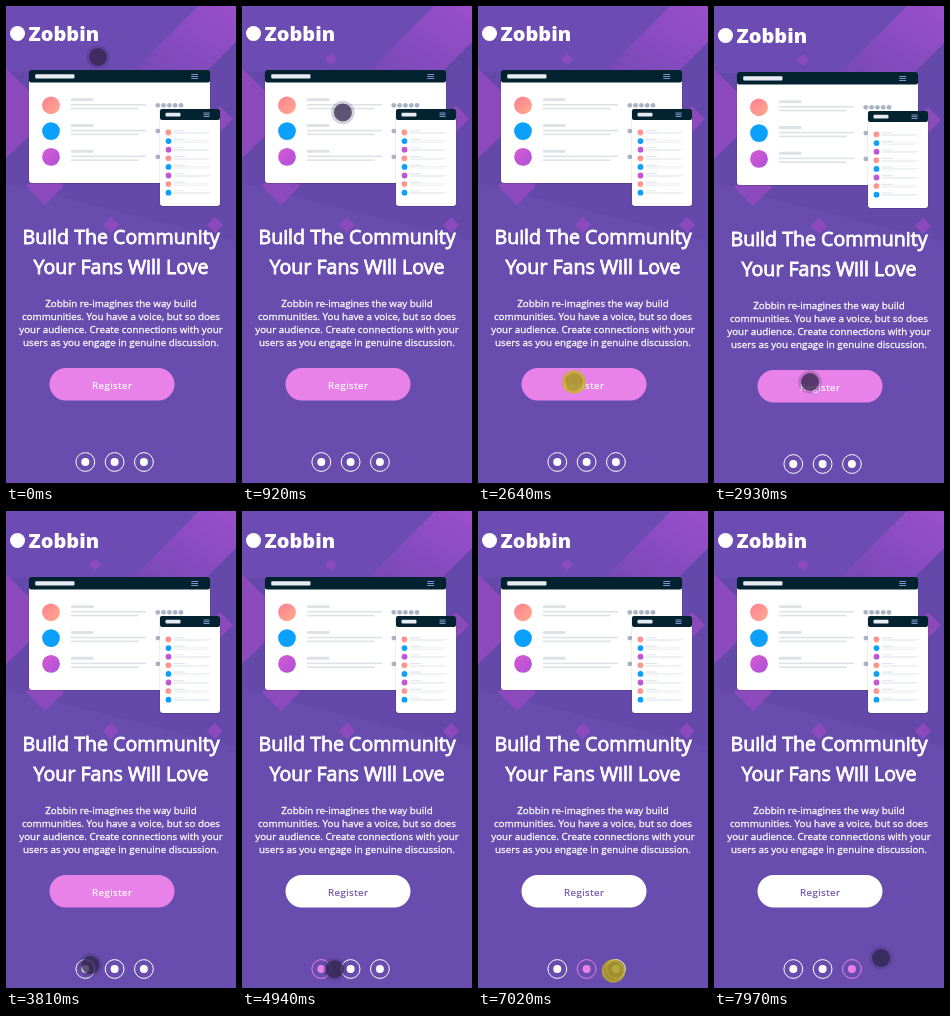
These frames come from a looping animation (230x477 px, 8 s). An HTML page:

```html
<!DOCTYPE html>
<html lang="en">
<head>
<meta charset="utf-8">
<title>Landing page tap demo</title>
<style>
  html, body { margin: 0; width: 100%; height: 100%; overflow: hidden; background: #684dae; }
  svg { display: block; width: 230px; height: 477px; }
  text { font-family: "Open Sans", sans-serif; fill: #fff; text-anchor: middle; }
  .logo { font-size: 20px; font-weight: 800; text-anchor: start; }
  .title { font-size: 19.6px; stroke: #fff; stroke-width: .85px; }
  .copy { font-size: 9.8px; stroke: #fff; stroke-width: .28px; }
  #label { font-size: 9.8px; letter-spacing: .4px; stroke-width: .2px; }
</style>
</head>
<body>
<svg viewBox="0 0 230 477">
  <defs>
    <linearGradient id="band" x1="1" y1="0" x2="0" y2="1">
      <stop stop-color="#9c4fcb"/><stop offset="1" stop-color="#7649b6"/>
    </linearGradient>
    <linearGradient id="coral" x2="1" y2="1">
      <stop stop-color="#ff7f92"/><stop offset="1" stop-color="#ffab8c"/>
    </linearGradient>
    <linearGradient id="violet" x2="1" y2="1">
      <stop stop-color="#d65bd2"/><stop offset="1" stop-color="#ad50d8"/>
    </linearGradient>
  </defs>
  <g id="backdrop"></g>
  <g id="page"></g>
  <g id="pointer">
    <circle id="halo" r="11.8"/>
    <circle id="core" r="9"/>
  </g>
</svg>
<script>
const LOOP = 8000, TAP = 370;
const WHITE = [255, 255, 255], PINK = [232, 130, 232], PURPLE = [104, 77, 174];
const DOTS = ['url(#coral)', '#0aa0fb', 'url(#violet)'];
const INK = '#03222f', LINE = '#dde2e7';
const $ = id => document.getElementById(id);

const repeat = (n, make) => Array.from({ length: n }, (_, i) => make(i)).join('');
const rect = (x, y, w, h, fill, r = 0) =>
  `<rect x="${x}" y="${y}" width="${w}" height="${h}" rx="${r}" fill="${fill}"/>`;
const circle = (x, y, r, fill) => `<circle cx="${x}" cy="${y}" r="${r}" fill="${fill}"/>`;
const poly = (points, fill) => `<polygon points="${points}" fill="${fill}"/>`;
const diamond = (x, y, r) =>
  poly(`${x - r},${y} ${x},${y - r} ${x + r},${y} ${x},${y + r}`, '#8d4abd');
const text = (x, y, cls, s) => `<text x="${x}" y="${y}" class="${cls}">${s}</text>`;

// White window with a dark title bar and a menu icon
const card = (x, y, w, h, bar) =>
  rect(x - .5, y, w + 1, h + 1, '#0002', 3) + rect(x, y, w, h, '#fff', 3) +
  rect(x, y, w, bar, INK, 2) + rect(x + bar / 2, y + bar * .33, w * .2 + 3, bar * .35, '#e8ecf2', 1) +
  repeat(3, i => rect(x + w - bar * 1.5, y + bar * (.32 + i * .16), bar * .55, .9, '#8f9ee0'));

// List entry: avatar, name and two lines of text, scaled by the avatar radius
const entry = (x, y, r, textX, width, i) =>
  circle(x, y, r, DOTS[i % 3]) +
  rect(textX, y - r * .8, width * .3, r * .33, LINE, r * .1) +
  rect(textX, y - r * .15, width, r * .18, LINE) +
  rect(textX, y + r * .28, width * .9, r * .18, LINE);

$('backdrop').innerHTML =
  poly('0,-4 230,-4 230,235 0,177', '#6448aa') +
  poly('0,-4 200,-4 130,66 0,66', '#6c4bb2') +
  poly('0,62 46,108 0,152', '#8d4abd') +
  poly('196,-4 230,-4 230,36 200,66 126,66', 'url(#band)') +
  diamond(89, 53, 6) + diamond(39, 180, 19) + diamond(214, 113, 13) +
  diamond(105, 219, 8) + diamond(209, 219, 8);

const copy = [
  'Zobbin re-imagines the way build',
  'communities. You have a voice, but so does',
  'your audience. Create connections with your',
  'users as you engage in genuine discussion.'
];

$('page').innerHTML =
  circle(11.5, 27.5, 7.5, '#fff') + text(22.5, 35, 'logo', 'Zobbin') +
  card(23, 64, 181, 113, 12.5) +
  repeat(3, i => {
    const y = 99.3 + i * 25.8;
    return entry(45, y, 8.9, 65, 75, i) + repeat(5, n => circle(151.8 + n * 5.8, y, 2.4, '#a9b3c6'));
  }) +
  card(154, 103, 60, 97, 11) +
  repeat(8, i => entry(162.5, 126.5 + i * 8.6, 2.9, 168, 37, i)) +
  text(115, 237.8, 'title', 'Build The Community') +
  text(115, 267.8, 'title', 'Your Fans Will Love') +
  copy.map((s, i) => text(115, 301 + i * 13, 'copy', s)).join('') +
  '<rect id="button" x="43.5" y="362" width="125" height="32.5" rx="16.2"/>' +
  '<text id="label" x="106.2" y="383">Register</text>' +
  repeat(3, i => `<g id="social${i}" transform="translate(${79.3 + i * 29.3} 456)">` +
    '<circle r="9.4" fill="none"/><circle r="4" stroke="none"/></g>');

// Eased pointer moves; bow bends the way sideways
const home = { x: 92, y: 51 };
const moves = [
  { start: 430, end: 2300, x: 96, y: 376, bow: 16 },
  { start: 3120, end: 3900, x: 84, y: 457, bow: 0 },
  { start: 4500, end: 5500, x: 105, y: 460, bow: 0 },
  { start: 5720, end: 6720, x: 135.5, y: 460, bow: 0 },
  { start: 7620, end: 7970, x: 167, y: 447, bow: 0 }
];
const taps = [2430, 4010, 5400, 6670];
const releases = taps.map(t => t + TAP);

const ramp = (t, start, length) => Math.min(1, Math.max(0, (t - start) / length));
const pulse = (t, start, end, length) => ramp(t, start, length) - ramp(t, end, length);
const smooth = k => k * k * (3 - 2 * k);
const mix = (a, b, k) => a.map((v, i) => v + (b[i] - v) * k);
const css = c => `rgba(${c.map((v, i) => i < 3 ? Math.round(v) : v)})`;

function pointerAt(t) {
  let { x, y } = home;
  for (const move of moves) {
    const k = smooth(ramp(t, move.start, move.end - move.start));
    x += (move.x - x) * k + move.bow * Math.sin(Math.PI * k);
    y += (move.y - y) * k;
  }
  return [x, y];
}

function draw(now) {
  const t = now % LOOP;
  const shift = t >= releases[0] ? 2 : 0;
  $('backdrop').setAttribute('transform', `translate(0 ${shift / 2})`);
  $('page').setAttribute('transform', `translate(0 ${shift})`);

  const active = ramp(t, releases[1], 200);
  const labelColor = css(mix(WHITE, PURPLE, active));
  $('button').style.fill = css(mix(PINK, WHITE, active));
  $('label').style.fill = $('label').style.stroke = labelColor;

  // Each icon stays lit from its own tap until the next one
  for (let i = 0; i < 3; i++) {
    const color = css(mix(WHITE, PINK, pulse(t, releases[i + 1], releases[i + 2] ?? LOOP, 250)));
    $('social' + i).style.cssText = `fill:${color};stroke:${color}`;
  }

  const press = taps.reduce((sum, tap, i) => sum + pulse(t, tap, releases[i], 100), 0);
  $('pointer').setAttribute('transform', `translate(${pointerAt(t)})`);
  $('halo').style.fill = css(mix([50, 35, 85, .2], [195, 182, 20, .75], press));
  $('core').style.fill = css(mix([46, 36, 72, .72], [140, 120, 30, .4], press));
  requestAnimationFrame(draw);
}
requestAnimationFrame(draw);
</script>
</body>
</html>
```
